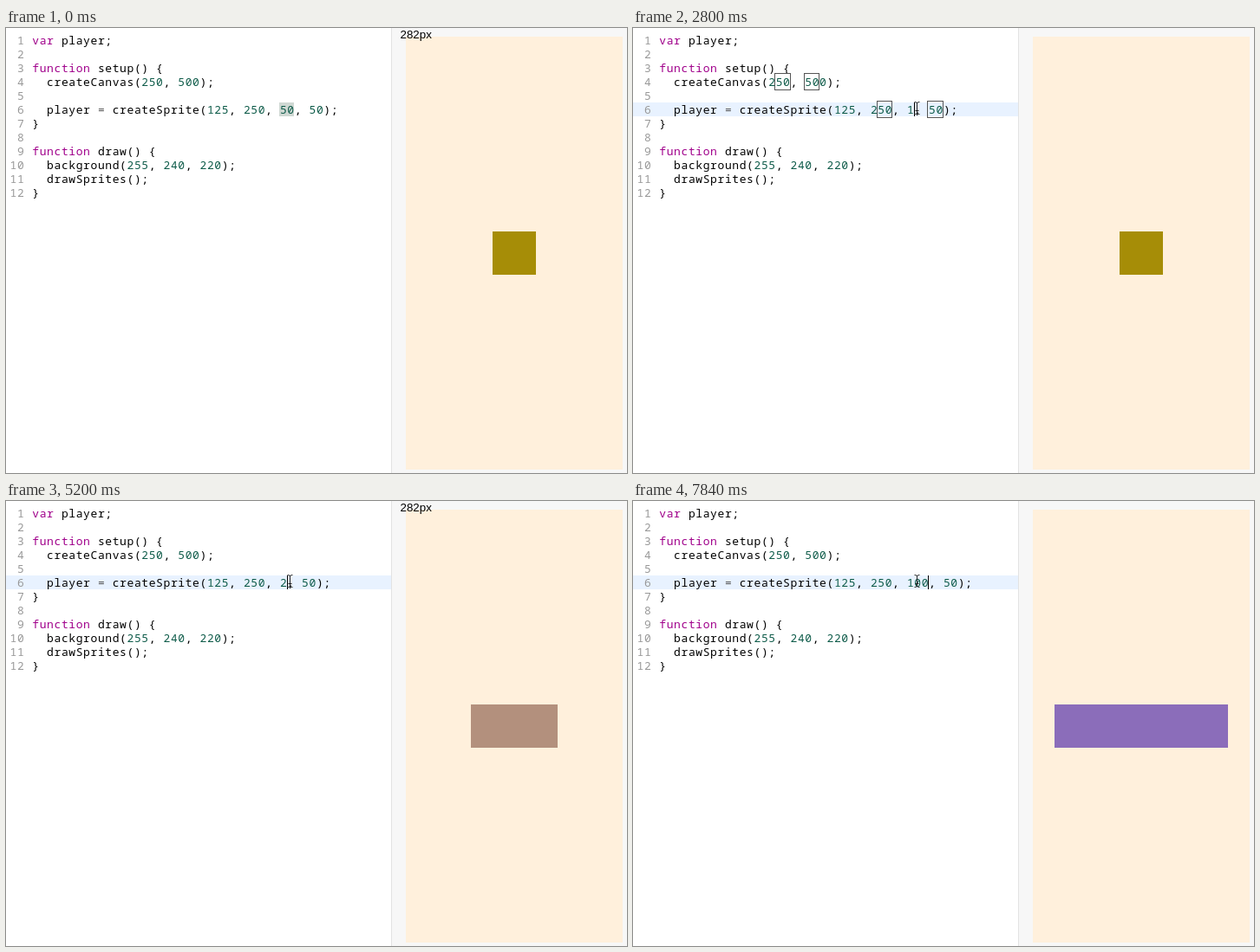
These frames come from a looping animation (716 by 514 pixels, 8000 ms). An HTML page:

```html
<!DOCTYPE html>
<html lang="en">
<head>
<meta charset="utf-8">
<title>Live code editor</title>
<style>
  html, body { margin: 0; width: 100%; height: 100%; overflow: hidden; background: #fff; }
  svg { display: block; width: 100vw; height: 100vh; }
  .code { font: 500 13px "Noto Sans Mono", "DejaVu Sans Mono", monospace; letter-spacing: .6px; }
  .label { font: 13.33px "Liberation Sans", Arial, sans-serif; }
  .num { fill: #999; text-anchor: end; }
  .keyword { fill: #a0008b; }
  .number { fill: #0f5c4a; }
  .operator { fill: #555; }
  .box { fill: none; stroke: #555; }
</style>
</head>
<body>
<svg viewBox="0 0 716 514">
  <rect width="716" height="514" fill="#fff"/>
  <g id="editor" class="code"></g>
  <rect x="444" width="272" height="514" fill="#f7f7f7"/>
  <rect x="444" width="1" height="514" fill="#e3e3e3"/>
  <rect x="461" y="10" width="250" height="500" fill="#fff0dc"/>
  <rect id="sprite" y="235" height="50"/>
  <text id="label" class="label" x="454.5" y="12">282px</text>
  <path id="mouse" fill="none" stroke="#222"
    d="M-3 -7H-2Q0 -7 0 -5Q0 -7 2 -7H3M0 -5V5M-2 3H2M-3 7H-2Q0 7 0 5Q0 7 2 7H3"/>
</svg>
<script>
const LOOP = 8000, TICK = 80;
const LEFT = 30, CHAR = 8.4, ROW = 16;
const EDIT_ROW = 5, EDIT_COL = 34;
const $ = id => document.getElementById(id);

// Each entry overrides part of the editor state from its time on.
const editing = [
  [0, { value: '50', selected: true, focused: false, boxes: false, caret: null }],
  [1520, { focused: true, boxes: true }],
  [2800, { value: '1', selected: false, caret: 1 }],
  [2880, { value: '10', boxes: false, caret: 2 }],
  [2960, { value: '100', caret: 3 }],
  [3520, { caret: 1 }],
  [3600, { selected: true, caret: null }],
  [3680, { boxes: true }],
  [5200, { value: '2', selected: false, boxes: false, caret: 1 }],
  [5360, { value: '20', caret: 2 }],
  [5440, { value: '200', caret: 3 }],
  [6000, { blink: true }],
  [6400, { blink: false, caret: 1 }],
  [6480, { selected: true, caret: null }],
  [6640, { boxes: true }],
  [7600, { value: '1', selected: false, boxes: false, caret: 1 }],
  [7760, { value: '10', caret: 2 }],
  [7840, { value: '100', caret: 3 }]
];
const runs = [
  [0, { width: 50, color: '#a68d07', labelEnd: 480 }],
  [3280, { width: 100, color: '#b3907d', labelEnd: 5280 }],
  [5680, { width: 200, color: '#8b6dba', labelEnd: 7680 }]
];

const stateAt = (track, t) =>
  Object.assign({}, ...track.filter(([start]) => start <= t).map(([, state]) => state));

const source = value => [
  'var player;', '', 'function setup() {', '  createCanvas(250, 500);', '',
  `  player = createSprite(125, 250, ${value}, 50);`, '}', '',
  'function draw() {', '  background(255, 240, 220);', '  drawSprites();', '}'
];

const colX = col => LEFT + col * CHAR;
const pixelX = col => Math.floor(colX(col));
const rect = (x, y, w, h, attrs) =>
  `<rect x="${x}" y="${y}" width="${w}" height="${h}" ${attrs}/>`;

function tokenClass(token) {
  if (/^(var|function)$/.test(token)) return 'keyword';
  if (/^\d/.test(token)) return 'number';
  return token === '=' ? 'operator' : '';
}

function tokens(line, y) {
  return [...line.matchAll(/\w+|[^\w\s]+/g)].map(m =>
    `<text class="${tokenClass(m[0])}" x="${colX(m.index) + .3}" y="${y}">${m[0]}</text>`).join('');
}

function matchBoxes(line, row, word) {
  return [...line.matchAll(new RegExp(word, 'g'))].map(({ index }) => {
    const left = pixelX(index), right = pixelX(index + word.length);
    return rect(left - .5, row * ROW + 4.5, right - left + 1, 19, 'class="box"');
  }).join('');
}

function editorMarkup(s) {
  // Matches of the old selection linger briefly after typing starts.
  const word = s.selected ? s.value : '50';
  return source(s.value).map((line, row) => {
    const top = row * ROW + 6, base = top + 13;
    const active = row === EDIT_ROW;
    let out = '';
    if (active && s.caret !== null) out += rect(0, top, 444, ROW, 'fill="#e8f2ff"');
    if (active && s.selected) {
      out += rect(pixelX(EDIT_COL), top, Math.round(s.value.length * CHAR), ROW,
        `fill="${s.focused ? '#cbd6e5' : '#cfd8d3'}"`);
    }
    if (s.boxes) out += matchBoxes(line, row, word);
    out += `<text class="num" x="21.3" y="${base}">${row + 1}</text>` + tokens(line, base);
    if (active && s.caret !== null && !s.blink) {
      out += rect(pixelX(EDIT_COL + s.caret), top, 1, ROW, 'fill="#000"');
    }
    return out;
  }).join('');
}

function mouseAt(t) {
  const glide = (start, end, a, b) => {
    const p = Math.min(1, Math.max(0, (t - start) / (end - start)));
    const eased = 1 - (1 - p) ** 2;
    return a.map((v, i) => Math.round(v + (b[i] - v) * eased) + .5);
  };
  return t < 880
    ? glide(80, 880, [392, 400], [360, 112])
    : glide(880, 1280, [360, 112], [327, 92]);
}

let shown = '';
function render(time) {
  const t = Math.floor(time % LOOP / TICK) * TICK;
  const markup = editorMarkup(stateAt(editing, t));
  if (markup !== shown) $('editor').innerHTML = shown = markup;

  const run = stateAt(runs, t);
  $('sprite').setAttribute('x', 586 - run.width / 2);
  $('sprite').setAttribute('width', run.width);
  $('sprite').setAttribute('fill', run.color);
  $('label').setAttribute('visibility', t < run.labelEnd ? 'visible' : 'hidden');

  $('mouse').setAttribute('visibility', t < 80 ? 'hidden' : 'visible');
  $('mouse').setAttribute('transform', `translate(${mouseAt(t)})`);
}

const began = performance.now();
function frame() {
  render(performance.now() - began);
  requestAnimationFrame(frame);
}
frame();
</script>
</body>
</html>
```
